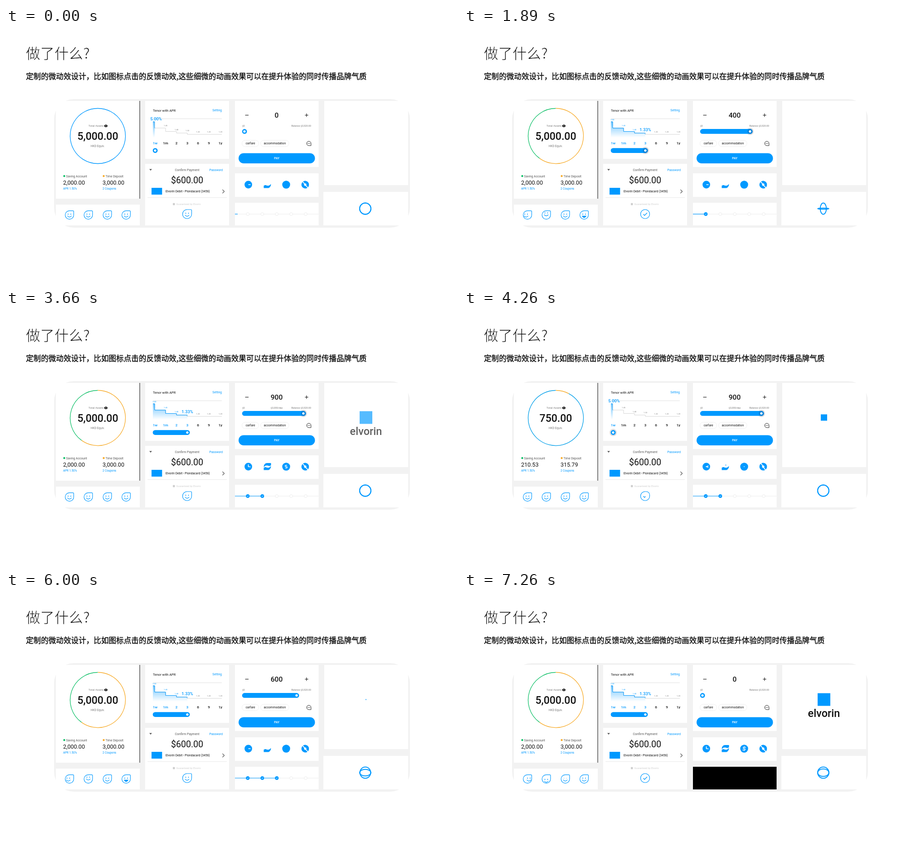
An HTML page for the animation above (7290 ms loop, 997 px wide and 561 px high).

```html
<!DOCTYPE html>
<html lang="zh">
<head>
<meta charset="utf-8">
<style>
html, body { margin: 0; width: 100%; height: 100%; overflow: hidden; background: #fff; }
svg { display: block; width: 997px; height: 561px; font-family: Roboto, Inter, sans-serif; }
.cjk { font-family: "Noto Sans CJK SC", "Noto Sans CJK", sans-serif; }
.light { stroke: #fff; stroke-width: .9px; }
.medium { stroke: #111; stroke-width: .4px; }
</style>
</head>
<body>
<svg id="stage" viewBox="0 0 997 561"></svg>
<script>
const LOOP = 7290, BLUE = '#0099ff', GREEN = '#12c06a', ORANGE = '#f7ac2c', INK = '#111', GREY = '#777';
const stage = document.getElementById('stage');

function set(node, attrs) {
  for (const name in attrs) node.setAttribute(name, attrs[name]);
  return node;
}
function add(tag, attrs, parent = stage) {
  return parent.appendChild(set(document.createElementNS('http://www.w3.org/2000/svg', tag), attrs));
}
const rect = (x, y, width, height, fill, more, parent) => add('rect', { x, y, width, height, fill, ...more }, parent);
const circle = (cx, cy, r, fill, more, parent) => add('circle', { cx, cy, r, fill, ...more }, parent);
const line = (d, stroke, width, more, parent) =>
  add('path', { d, fill: 'none', stroke, 'stroke-width': width, ...more }, parent);
const group = (x, y) => add('g', { transform: `translate(${x} ${y})` });
// y is the middle of the capitals
function text(str, x, y, size, fill = INK, more = {}) {
  const node = add('text', { x, y: y + size * .355, 'font-size': size, fill, ...more });
  node.textContent = str;
  return node;
}
const MID = { 'text-anchor': 'middle' }, END = { 'text-anchor': 'end' };
const MEDIUM_MID = { ...MID, 'font-weight': 500 };
const show = (node, on) => node.setAttribute('visibility', on ? 'visible' : 'hidden');
const money = v => v.toLocaleString('en-US', { minimumFractionDigits: 2, maximumFractionDigits: 2 });
const polar = (r, deg) => {
  const a = deg * Math.PI / 180;
  return `${(r * Math.sin(a)).toFixed(2)} ${(-r * Math.cos(a)).toFixed(2)}`;
};
const arc = (r, from, to) => `M${polar(r, from)} A${r} ${r} 0 ${to - from > 180 ? 1 : 0} 1 ${polar(r, to)}`;
// linear keyframes: [time, value], ...
function key(t, ...frames) {
  if (t <= frames[0][0]) return frames[0][1];
  for (let i = 1; i < frames.length; i++) {
    const [a, u] = frames[i - 1], [b, v] = frames[i];
    if (t < b) return u + (v - u) * (t - a) / (b - a);
  }
  return frames[frames.length - 1][1];
}
function mix(a, b, k) {
  const part = (c, i) => parseInt(c.substr(1 + 2 * i, 2), 16);
  return `rgb(${[0, 1, 2].map(i => Math.round(part(a, i) + (part(b, i) - part(a, i)) * k))})`;
}

// headings and card frame
text('做了什么?', 44, 56.8, 31.5, INK, { class: 'cjk light', 'font-weight': 300 });
text('定制的微动效设计，比如图标点击的反馈动效,这些细微的动画效果可以在提升体验的同时传播品牌气质',
  44, 107.4, 16.6, INK, { class: 'cjk medium', 'font-weight': 500 });

rect(106, 157, 785, 284, '#f2f2f2', { rx: 44 });
const cards = {
  assets: [110, 161, 185, 216], faces: [110, 390, 185, 46],
  tenor: [307, 161, 185, 128], confirm: [307, 300, 185, 136],
  pay: [505, 161, 184.5, 146], icons: [505, 321, 184.5, 52], steps: [505, 386, 184.5, 50],
  brand: [702, 161, 185, 186], coin: [700, 362, 187, 74]
};
for (const name in cards) rect(...cards[name], '#fff');

// assets
const dial = group(202.5, 238.5);
const ringRest = line('', BLUE, 1.3, {}, dial);
const ringArc = line('', ORANGE, 1.3, {}, dial);
text('Total Assets', 182, 216, 6, GREY);
add('ellipse', { cx: 220.3, cy: 216.2, rx: 3.5, ry: 2.7, fill: INK });
circle(220.3, 216.2, 1, '#fff');
text('HKD Equiv.', 202, 260.5, 6.3, GREY, MID);
const total = text('', 202.5, 238.5, 23, INK, MEDIUM_MID);
function account(x, dot, name, note) {
  circle(x + 2.5, 327, 2.2, dot);
  text(name, x + 6.5, 327.3, 6.7, '#555');
  text(note, x, 354.7, 6.3, BLUE);
  return text('', x, 341.5, 12.5);
}
const saving = account(126, GREEN, 'Saving Account', 'APR 1.50%');
const deposit = account(213, ORANGE, 'Time Deposit', '2 Coupons');

function drawAssets(t) {
  const p = t % 2070, k = Math.min(20, Math.floor(p / 38)), shown = k || 20;
  total.textContent = money(250 * shown);
  saving.textContent = money(2000 * (shown - 1) / 19);
  deposit.textContent = money(3000 * (shown - 1) / 19);
  const sweep = 216 * Math.pow(k / 20, 1.08);
  set(ringRest, { d: arc(61, sweep, 359.99), stroke: mix(BLUE, GREEN, k / 20) });
  ringArc.setAttribute('d', k ? arc(61, 0, sweep) : '');
  return p > 2030;
}

// smiling drops
function dropPath(r, corner) {
  return `M0 ${-r} H${r - corner} A${corner} ${corner} 0 0 1 ${r} ${corner - r} V0 A${r} ${r} 0 1 1 0 ${-r} Z`;
}
function makeFace(x, y, r) {
  const g = group(x, y);
  const outline = line(dropPath(r, 2), BLUE, 1.15, {}, g);
  const look = add('g', {}, g);
  const eyes = [-3, 3].map(cx => add('ellipse', { cx, cy: -1.8, rx: .95, ry: 1.15, fill: BLUE }, look));
  const mouth = line('M-4.2 2.2 Q0 7 4.2 2.2', BLUE, 1.15, { 'stroke-linecap': 'round' }, look);
  return { g, outline, look, eyes, mouth };
}
const faces = [140, 181.5, 223.5, 265].map(x => makeFace(x, 413, 9.4));

function drawFaces(t) {
  const p = t % 4620;
  const turn = key(p, [650, 0], [1500, -3], [1900, -3], [2400, 3], [2750, 3], [3200, 0]);
  faces[0].look.setAttribute('transform', `translate(${turn} 0)`);
  faces[1].look.setAttribute('transform', `translate(0 ${turn * .9})`);
  const blink = (p > 630 && p < 760) || (p > 2620 && p < 2740);
  faces[2].eyes.forEach(eye => eye.setAttribute('ry', blink ? .35 : 1.15));
  const open = key(p, [500, 0], [680, .7], [1800, .7], [1860, 1], [1890, .7], [2610, .7], [2640, 0]);
  set(faces[3].mouth, {
    d: `M-4.2 2.2 Q0 ${7 + 3 * open} 4.2 2.2${open > .2 ? ' Z' : ''}`,
    fill: open > .2 ? BLUE : 'none'
  });
  return p > 4580;
}

// tenor slider
text('Tenor with APR', 324, 182, 7.4);
text('Setting', 476, 182, 6.6, BLUE, END);
line('M324 200.5 H476', '#d4d4d4', .7);
const stepShape = 'M324 207 H328 V221 H352 V228.5 H376 V232 H400 V235 H476';
const defs = add('defs', {});
const fade = add('linearGradient', { id: 'fade', x1: 0, y1: 0, x2: 0, y2: 1 }, defs);
add('stop', { offset: 0, 'stop-color': BLUE, 'stop-opacity': .55 }, fade);
add('stop', { offset: 1, 'stop-color': BLUE, 'stop-opacity': 0 }, fade);
const reached = rect(324, 200, 4, 45, '#000', {}, add('clipPath', { id: 'reached' }, defs));
line(stepShape, '#c4c4c4', .7);
const active = add('g', { 'clip-path': 'url(#reached)' });
add('path', { d: stepShape + ' V242 H324 Z', fill: 'url(#fade)' }, active);
line(stepShape, BLUE, 1, {}, active);
const tenorX = [329, 352, 376, 400, 423.5, 447.5, 473];
const rates = ['5.00', '1.45', '1.40', '1.33', '1.29', '1.29', '1.29'];
const rateY = [203, 216, 225, 227, 230, 230, 230];
const small = rates.map((r, i) => text(r, tenorX[i] - (i ? 0 : 1.5), rateY[i], 4, GREY, MID));
const terms = ['1w', '1m', '2', '3', '6', '9', '1y'].map((s, i) =>
  text(s, tenorX[i], 254.3, 8, INK, MEDIUM_MID));
const bigRate = text('', 0, 0, 9.4, BLUE, MEDIUM_MID);

function makeSlider(left, y) {
  const halo = circle(0, y, 8, '#5a6570', { opacity: .22 });
  const bar = rect(left, y - 5.3, 10, 10.6, BLUE, { rx: 5.3 });
  const press = circle(0, y, 5.8, '#003c78', { opacity: .25 });
  const dot = circle(0, y, 2.6, '#fff');
  return (x, pressed) => {
    bar.setAttribute('width', x + 5.5 - left);
    for (const node of [halo, dot, press]) node.setAttribute('cx', x);
    show(halo, pressed);
    show(press, pressed && x > left + 12);
  };
}
const tenorSlider = makeSlider(323.7, 270.6);

function drawTenor(t) {
  const p = t % 3720;
  const x = key(p, [700, 329], [1150, 352], [1400, 376], [1590, 395], [1700, 400]);
  const i = Math.floor((x - 329) / 23.7 + .05);
  tenorSlider(x, p > 480 && p < 2250);
  reached.setAttribute('width', i ? x - 324 : 4.3);
  terms.forEach((node, n) => node.setAttribute('fill', n <= i ? BLUE : INK));
  small.forEach((node, n) => {
    show(node, n !== i);
    node.setAttribute('fill', n < i ? BLUE : GREY);
  });
  bigRate.textContent = ['5.00%', '1.45%', '1.33%', '1.33%'][i];
  set(bigRate, { x: i ? tenorX[i] : 331, y: [201, 214, 223, 225][i] + 3.4 });
  return p > 3680;
}

// payment confirmation
add('path', { d: 'M316 311.5 H322 L319 315 Z', fill: '#555' });
text('Confirm Payment', 399.5, 313.3, 7, '#555', MID);
text('Password', 478, 313.3, 6.7, BLUE, END);
text('$600.00', 399.5, 335.8, 19.6, INK, MID);
rect(321, 353, 23.3, 15, BLUE);
text('Elvorin Debit - Plondacard (3456)', 352, 361, 6.7);
line('M477.5 357 L481.5 361 L477.5 365', '#555', 1.2);
line('M312 374.5 H487', '#e4e4e4', .8);
rect(368, 386.7, 4.6, 4.6, '#cfcfcf');
text('Guaranteed by Elvorin', 375.5, 389.2, 5.6, '#cfcfcf');
const payer = makeFace(399.5, 411, 10);
const tick = line('M-4 .2 L-1.2 3 L4.4 -2.8', BLUE, 1.3, { pathLength: 100 }, payer.g);

function drawConfirm(t) {
  const p = t % 2480;
  const done = key(p, [1650, 0], [1780, 60], [1860, 100]);
  payer.outline.setAttribute('d', dropPath(10, key(p, [1600, 2], [1860, 10])));
  payer.look.setAttribute('opacity', key(p, [1560, 1], [1650, 0]));
  payer.mouth.setAttribute('d', `M-4.2 2.4 Q0 ${key(p, [1400, 7.2], [1520, 6], [1600, 4])} 4.2 2.4`);
  tick.setAttribute('stroke-dasharray', `${done} 200`);
  show(tick, done > 0);
  return p > 2440;
}

// amount slider
line('M527.5 192.5 H535', INK, 1.1);
line('M659.3 192.5 H666.7 M663 188.8 V196.2', INK, 1.1);
const amount = text('', 597, 192.7, 15.5, INK, MEDIUM_MID);
text('$0', 521, 216, 5, GREY);
text('Balance $3,520.00', 673, 216, 5.3, GREY, END);
const limit = text('$3,000/day', 597, 216, 5.3, GREY, MID);
const amountSlider = makeSlider(520.8, 228.4);
function chip(x, w, label) {
  rect(x, 248, w, 14, '#fff', { rx: 7, stroke: '#ebebeb', 'stroke-width': .8 });
  text(label, x + w / 2, 255, 6.7, INK, MID);
}
chip(520.5, 37, 'carfare');
chip(561.5, 62.5, 'accommodation');
line('M668 250.2 A4.8 4.8 0 1 0 668 259.8 H672.8 V255 A4.8 4.8 0 0 0 668 250.2 Z', INK, .9);
[665.8, 668, 670.2].forEach(x => circle(x, 255, .7, INK));
rect(513, 276.5, 168.5, 22.6, BLUE, { rx: 11.3 });
text('PAY', 597.2, 288, 6.8, '#fff', MEDIUM_MID);

function drawPay(t) {
  const p = t % 6470;
  const x = key(p, [950, 526], [1750, 631], [2200, 631], [2600, 646], [3300, 656], [4500, 656], [5000, 641]);
  const value = x < 631 ? (x - 526) / 105 * 400 : 400 + (x - 631) * 20;
  amount.textContent = Math.round(value / 100) * 100;
  show(limit, x > 652);
  amountSlider(x, p > 850 && p < 5150);
  return t >= 6465 && t < 6510;
}

// action icons
const clock = group(534.5, 346);
circle(0, 0, 8.4, BLUE, {}, clock);
const hands = line('', '#fff', 1.6, {}, clock);
const palm = group(576.5, 346);
const palmShape = 'M-8 2.6 C-5.5 .6 -3 .6 -1 2.2 H3.5 L8 -1.2 C7.8 3.8 5 7.6 1 7.6 H-8 Z';
add('path', { d: palmShape, fill: BLUE }, palm);
const palmTop = add('path', { d: palmShape, fill: BLUE, transform: 'translate(0 -.4) rotate(180)' }, palm);
const palmCoin = circle(1, -3.5, 3, BLUE, {}, palm);
const cash = group(618, 346);
circle(0, 0, 8.7, BLUE, {}, cash);
const curve = line('M3.2 -3 H-.8 A1.5 1.5 0 0 0 -.8 0 H.8 A1.5 1.5 0 0 1 .8 3 H-3.2', '#fff', 1.4,
  { pathLength: 100, 'stroke-linecap': 'round' }, cash);
const cashBars = line('M0 -5.4 V-3 M0 3 V5.4', '#fff', 1.3, {}, cash);
const wheel = group(660, 346);
const spin = add('g', {}, wheel);
circle(0, 0, 8.4, BLUE, {}, spin);
line('M-1 -9 L0 -2 M1 9 L0 2', '#fff', 1.7, {}, spin);
circle(0, 0, 2.6, '#fff', {}, spin);

function drawIcons(t) {
  const p = t % 1890;
  const a = key(p, [430, 90], [480, 112], [720, 258], [810, 300], [1000, 360]);
  const b = key(p, [430, 90], [480, 70], [720, 80], [810, 62], [1000, 95]);
  hands.setAttribute('d', `M${polar(5, a)} L0 0 L${polar(5, b)}`);
  palmCoin.setAttribute('r', key(p, [420, 0], [480, 1], [680, 3.1], [950, 3.1], [1100, 0]));
  palmTop.setAttribute('opacity', key(p, [950, 0], [1100, 1], [1780, 1], [1850, 0]));
  const length = key(p, [430, 0], [480, 3], [720, 42], [810, 66], [1000, 100], [1750, 100], [1850, 0]);
  set(curve, { 'stroke-dasharray': `${length} 200`, 'stroke-dashoffset': length / 2 - 50 });
  show(curve, length > 0);
  show(cashBars, length === 100);
  spin.setAttribute('transform', `rotate(${key(p, [460, -35], [480, -28], [720, -35], [810, 0], [1200, 145])})`);
  return t > 100 && p > 1850;
}

// progress steps
line('M505 411 H689.5', '#e8e8e8', .8);
const track = line('', BLUE, 1.2);
const nodes = [533.3, 565.3, 597.3, 629, 661].map((x, i) => {
  const g = group(x, 411);
  return {
    start: [290, 2590, 5150][i] || Infinity,
    body: circle(0, 0, 3.3, '#fff', {}, g),
    dot: circle(0, 0, 1.1, BLUE, {}, g),
    check: line('M-1.6 0 L-.4 1.2 L1.7 -1.1', '#fff', .9, {}, g)
  };
});

function drawSteps(t) {
  const x = key(t, [0, 511], [280, 533], [2350, 533], [2600, 561], [2640, 565], [4920, 565], [5160, 597]);
  track.setAttribute('d', `M505 411 H${x}`);
  for (const { start, body, dot, check } of nodes) {
    const age = t - start, full = age > 350;
    set(body, {
      r: age < 0 ? 3.3 : key(age, [0, 1.8], [140, 3.3], [350, 3.7]),
      fill: full ? BLUE : '#fff',
      stroke: age < 0 ? '#e8e8e8' : age < 60 ? '#fff' : BLUE,
      'stroke-width': age < 0 ? .8 : 1
    });
    show(dot, age >= 0 && !full);
    show(check, full);
  }
  return t > 7245;
}

// brand
const mark = rect(0, 0, 0, 0, BLUE);
const brandName = text('elvorin', 794, 268, 23.5, INK, MEDIUM_MID);

function drawBrand(t) {
  const p = Math.max(0, t - 25) % 1875;
  const side = key(p, [330, 0], [485, 14], [700, 28]);
  const out = key(p, [1720, 1], [1840, 0]);
  set(mark, { x: 794 - side / 2, y: 237.5 - side / 2, width: side, height: side, opacity: out });
  brandName.setAttribute('opacity', key(p, [880, 0], [1080, 1]) * out);
  return t > 1000 && p < 58;
}

// spinning coin rings
const [ringA, ringB] = [0, 1].map(() =>
  add('ellipse', { cx: 792.5, cy: 399, fill: 'none', stroke: BLUE, 'stroke-width': 2 }));

function drawCoin(t) {
  const p = t % 4720;
  const a = key(p, [500, 0], [590, 37], [1760, 250], [1890, 303], [2250, 360]);
  const b = key(p, [650, 0], [1760, 221], [1890, 276], [2540, 492], [2610, 540]);
  const squash = deg => 12.4 * Math.abs(Math.cos(deg * Math.PI / 180));
  set(ringA, { rx: squash(a), ry: 12.4 });
  set(ringB, { rx: 12.4, ry: Math.max(.3, squash(b)) });
}

const painters = {
  assets: drawAssets, faces: drawFaces, tenor: drawTenor, confirm: drawConfirm, pay: drawPay,
  icons: drawIcons, steps: drawSteps, brand: drawBrand, coin: drawCoin
};
// each clip goes black for a moment where it restarts
const covers = {};
for (const name in cards) covers[name] = rect(...cards[name], '#000');
line('M295 161 V377', '#3a3a3a', 1.3);

function draw(t) {
  for (const name in painters) show(covers[name], painters[name](t));
}
let began;
function tickFrame(now) {
  began ??= now;
  draw((now - began) % LOOP);
  requestAnimationFrame(tickFrame);
}
draw(0);
requestAnimationFrame(tickFrame);
</script>
</body>
</html>
```
